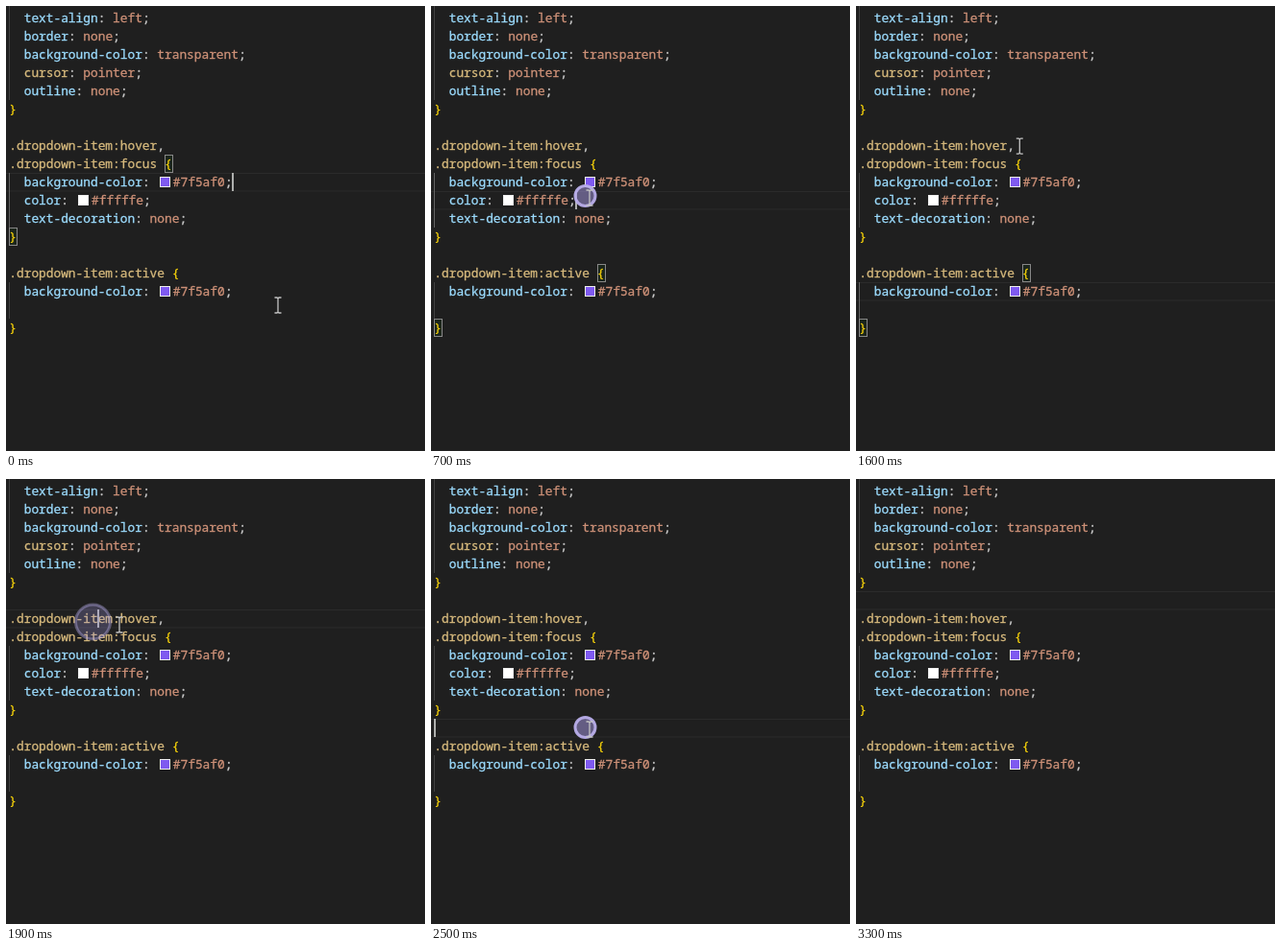
Animation, 436 px wide and 464 px high, one loop 3800 ms. Source, as an HTML page:

```html
<!DOCTYPE html>
<html lang="en">
<head>
<meta charset="utf-8">
<title>Stylesheet editor</title>
<style>
  html, body { margin: 0; width: 100%; height: 100%; overflow: hidden; background: #1f1f1f; }
  svg { display: block; width: 436px; height: 464px; }
  text {
    font: 12.83px "Noto Sans Mono", "DejaVu Sans Mono", monospace;
    white-space: pre; stroke: currentColor; fill: currentColor; stroke-width: .3px;
  }
  .prop { color: #9cdcfe; }
  .sel { color: #d7ba7d; }
  .val { color: #ce9178; }
  .brace { color: #f5d10a; }
  .punct { color: #cccccc; }
  .box { fill: rgba(0, 100, 0, .1); stroke: #888; }
</style>
</head>
<body>
<svg id="stage" viewBox="0 0 436 464"></svg>
<script>
const LOOP = 3800, STEP = 100, LAST = 3300;
const LEFT = 3.3, CHAR = 7.7, TOP = 3, ROW = 19, SWATCH = 16.5;
const stage = document.getElementById("stage");

const colX = col => LEFT + col * CHAR;
const rowY = row => TOP + row * ROW;

function set(node, attrs) {
  for (const key in attrs) node.setAttribute(key, attrs[key]);
  return node;
}
function add(tag, attrs) {
  const node = document.createElementNS("http://www.w3.org/2000/svg", tag);
  return stage.appendChild(set(node, attrs));
}
const show = (node, on) => set(node, { visibility: on ? "visible" : "hidden" });

const source = `  text-align: left;
  border: none;
  background-color: transparent;
  cursor: pointer;
  outline: none;
}

.dropdown-item:hover,
.dropdown-item:focus {
  background-color: #7f5af0;
  color: #fffffe;
  text-decoration: none;
}

.dropdown-item:active {
  background-color: #7f5af0;

}`.split("\n");

// Code blocks: guide rows and the places of their braces
const blocks = [
  { first: 0, last: 4 },
  { first: 9, last: 11, open: [8, 21], close: [12, 0] },
  { first: 15, last: 16, open: [14, 22], close: [17, 0] }
];

const lineMark = add("rect", { x: -2, width: 440, height: 18.5, fill: "none", stroke: "#2b2b2b" });
for (const block of blocks) {
  const y = block.first ? rowY(block.first) : 0;
  block.guide = add("rect", { x: 3, y, width: 1, height: rowY(block.last + 1) - y });
}
const braceBoxes = [0, 1].map(() => add("rect", { class: "box", width: 8, height: 18 }));

function addText(text, kind, x, row) {
  add("text", { class: kind, x, y: rowY(row) + 14 }).textContent = text;
}

function addLine(line, row) {
  const rule = line.match(/^  ([\w-]+): (.+);$/);
  if (!rule) {
    for (const part of line.matchAll(/[{}]|,|[^\s{},]+/g)) {
      const kind = part[0] === "," ? "punct" : /[{}]/.test(part[0]) ? "brace" : "sel";
      addText(part[0], kind, colX(part.index), row);
    }
    return;
  }
  const [, name, value] = rule;
  let x = colX(name.length + 4);
  addText(name, name === "cursor" ? "sel" : "prop", colX(2), row);
  addText(":", "punct", colX(name.length + 2), row);
  if (value[0] === "#") {
    add("rect", { x: Math.round(x + 2.7) + .5, y: rowY(row) + 4.5, width: 10, height: 10, fill: value, stroke: "#eee" });
    x += SWATCH;
  }
  addText(value, "val", x, row);
  addText(";", "punct", x + value.length * CHAR, row);
}
source.forEach(addLine);

const caret = add("rect", { width: 2, height: 19, fill: "#aeafad" });
const ring = add("circle", { fill: "#a99ce8", stroke: "#b9aeea", "stroke-width": 3 });
const pointer = add("path", {
  d: "M-3.5-8H-1L0-7L1-8H3.5M0-7V7M-3.5 8H-1L0 7L1 8H3.5",
  fill: "none", stroke: "#c4c4c4", "stroke-width": 1.3
});

// Mouse presses and the caret place that follows from each
const lineEnd = colX(28) + SWATCH;
const clicks = [
  { t: -200, row: 9, x: lineEnd, block: 1, quiet: true },
  { t: 300, row: 16, x: colX(2), block: 2 },
  { t: 700, row: 10, x: colX(17) + SWATCH, block: 1 },
  { t: 900, row: 15, x: lineEnd, block: 2 },
  { t: 1800, row: 7, x: colX(12), block: null },
  { t: 2100, row: 16, x: colX(2), block: 2 },
  { t: 2400, row: 13, x: colX(0), block: null, hold: 100 },
  { t: 2800, row: 6, x: colX(0), block: null }
];

// Mouse path: time, x, y
const path = [
  [0, 283, 312], [300, 282, 322], [500, 270, 289], [700, 165, 200],
  [900, 262, 299], [1200, 305, 141], [1300, 309, 137], [1800, 95, 151],
  [1900, 118, 152], [2100, 296, 316], [2400, 166, 262], [2500, 165, 261],
  [2600, 205, 222], [2800, 150, 128], [3000, 150, 140], [3100, 118, 165],
  [3200, 45, 178], [3300, -20, 178]
];

function mouseAt(t) {
  const next = path.findIndex(p => p[0] >= t);
  if (next < 0) return path.at(-1).slice(1);
  const b = path[next], a = path[Math.max(next - 1, 0)];
  const u = b === a ? 0 : (t - a[0]) / (b[0] - a[0]);
  const ease = u * u * (3 - 2 * u);
  return [1, 2].map(i => a[i] + (b[i] - a[i]) * ease);
}

const clickAt = t => clicks.findLast(c => c.t <= t);

function draw(time) {
  const t = Math.min(Math.floor(time % LOOP / STEP) * STEP, LAST);
  const click = clickAt(t), age = t - click.t;

  set(lineMark, { y: rowY(click.row) + .5 });
  set(caret, { x: Math.round(click.x - .5), y: rowY(click.row) });
  show(caret, age < 500);

  blocks.forEach((b, i) => set(b.guide, { fill: i === click.block ? "#626262" : "#404040" }));

  // Brace matching lags one step behind the caret
  const matched = blocks[clickAt(t - STEP)?.block];
  braceBoxes.forEach((box, i) => {
    show(box, matched);
    if (!matched) return;
    const [row, col] = i ? matched.close : matched.open;
    set(box, { x: Math.round(colX(col)) + .5, y: rowY(row) + .5 });
  });

  const hold = click.hold || 0, released = age > hold;
  show(ring, !click.quiet && age <= hold + STEP);
  const [px, py] = mouseAt(click.t + hold);
  set(ring, {
    cx: px - 4.5, cy: py - 2, r: released ? 18 : 10.5,
    "fill-opacity": released ? .25 : .5,
    "stroke-opacity": released ? .4 : .95
  });

  const [x, y] = mouseAt(t);
  set(pointer, { transform: `translate(${x.toFixed(1)} ${y.toFixed(1)})` });
}

const start = performance.now();
function tick() {
  draw(performance.now() - start);
  requestAnimationFrame(tick);
}
tick();
</script>
</body>
</html>
```
